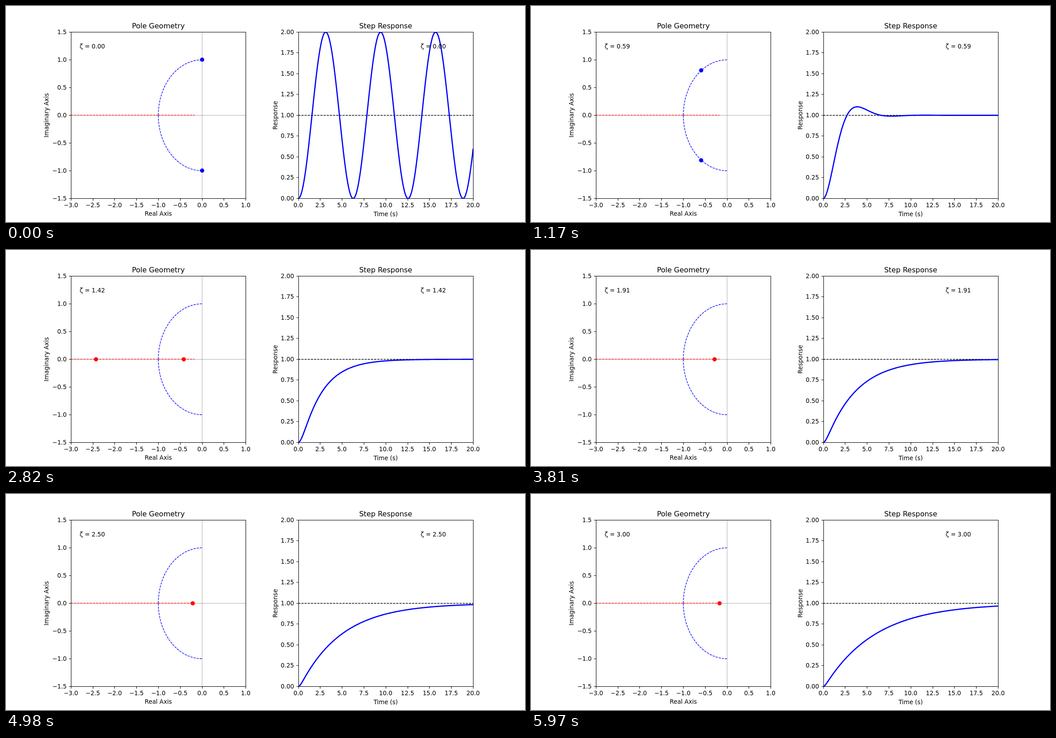
An HTML page for the animation above (6000 ms loop, 1159 by 483 pixels).

```html
<!DOCTYPE html>
<html lang="en">
<head>
<meta charset="utf-8">
<title>Pole geometry and step response</title>
<style>
  html, body { margin: 0; width: 100%; height: 100%; overflow: hidden; background: #fff; }
  svg { display: block; width: 1159px; height: 483px; }
  text { font: 13.333px "DejaVu Sans", sans-serif; fill: #000; }
  .title { font-size: 16px; }
  .frame, .tick { fill: none; stroke: #000; stroke-width: 1.07; }
  .zero { stroke: #808080; stroke-width: 0.67; }
  .dash { fill: none; stroke-width: 1.33; stroke-dasharray: 4.93 2.13; }
  .curve { fill: none; stroke: #00f; stroke-width: 2.67; stroke-linejoin: round; stroke-linecap: square; }
</style>
</head>
<body>
<svg id="stage" viewBox="0 0 1159 483"></svg>
<script>
const STEP = 30, COUNT = 200, MAX_ZETA = 3;
const TOP = 58.4, BOTTOM = 430.3, WIDTH = 390.5;
const svg = document.getElementById('stage');

function add(parent, tag, attrs, text) {
  const el = document.createElementNS('http://www.w3.org/2000/svg', tag);
  for (const k in attrs) el.setAttribute(k, attrs[k]);
  if (text !== undefined) el.textContent = text;
  parent.appendChild(el);
  return el;
}

const label = (x, y, text, anchor = 'middle', more = {}) =>
  add(svg, 'text', { x, y, 'text-anchor': anchor, ...more }, text);
const snap = v => Math.floor(v) + 0.5;
const number = (v, digits) => v.toFixed(digits).replace('-', '\u2212');

// Points along a curve as path data
function trace(axes, fn, from, to, n) {
  let d = '';
  for (let i = 0; i <= n; i++) {
    const [x, y] = fn(from + (to - from) * i / n);
    d += (i ? 'L' : 'M') + axes.x(x).toFixed(2) + ' ' + axes.y(y).toFixed(2);
  }
  return d;
}

function makeAxes(o) {
  const axes = {
    x: v => o.left + (v - o.x0) / (o.x1 - o.x0) * WIDTH,
    y: v => BOTTOM - (v - o.y0) / (o.y1 - o.y0) * (BOTTOM - TOP)
  };
  const clip = add(add(svg, 'defs', {}), 'clipPath', { id: o.id });
  add(clip, 'rect', { x: o.left, y: TOP, width: WIDTH, height: BOTTOM - TOP });
  axes.plot = add(svg, 'g', { 'clip-path': `url(#${o.id})` });

  const left = o.edge + 0.5, bottom = snap(BOTTOM);
  for (let v = o.x0; v <= o.x1; v += o.dx) {
    const x = snap(axes.x(v) + 0.4);
    add(svg, 'path', { class: 'tick', d: `M${x} ${bottom}v4.8` });
    label(axes.x(v), 450, number(v, 1));
  }
  for (let v = o.y0; v <= o.y1; v += o.dy) {
    const y = snap(axes.y(v));
    add(svg, 'path', { class: 'tick', d: `M${left} ${y}h-4.8` });
    label(o.left - 9.3, y + 4.5, number(v, o.digits), 'end');
  }
  add(svg, 'rect', { class: 'frame', x: left, y: snap(TOP), width: 390, height: 372 });

  const mid = o.left + WIDTH / 2;
  label(mid, 50, o.title, 'middle', { class: 'title' });
  label(mid, o.xBase, o.xName);
  label(0, 0, o.yName, 'middle', { transform: `translate(${o.yBase} 244.4) rotate(-90)` });
  axes.note = label(axes.x(o.note[0]), 95, '', 'start');
  return axes;
}

const poles = makeAxes({
  id: 'clipPoles', left: 144.9, edge: 145, x0: -3, x1: 1, dx: 0.5, y0: -1.5, y1: 1.5, dy: 0.5,
  digits: 1, title: 'Pole Geometry', xName: 'Real Axis', yName: 'Imaginary Axis',
  xBase: 469, yBase: 95, note: [-2.8]
});
const step = makeAxes({
  id: 'clipStep', left: 652.6, edge: 653, x0: 0, x1: 20, dx: 2.5, y0: 0, y1: 2, dy: 0.25,
  digits: 2, title: 'Step Response', xName: 'Time (s)', yName: 'Response',
  xBase: 469.5, yBase: 606, note: [14]
});

// Pole plane: zero lines, loci and the two moving poles
add(poles.plot, 'path', { class: 'zero', d: 'M144 244.5H536' });
add(poles.plot, 'path', { class: 'zero', d: 'M438 58V431' });
for (const sign of [1, -1]) {
  add(poles.plot, 'path', { class: 'dash', stroke: '#00f',
    d: trace(poles, a => [-Math.sin(a), sign * Math.cos(a)], 0, Math.PI / 2, 90) });
}
for (const sign of [1, -1]) {
  const end = poles.x(-MAX_ZETA + sign * Math.sqrt(MAX_ZETA ** 2 - 1));
  add(poles.plot, 'path', { class: 'dash', stroke: '#f00', d: `M${poles.x(-1)} 244.2H${end}` });
}
const dots = [1, -1].map(() => add(poles.plot, 'circle', { r: 4.67 }));

// Step response plane
add(step.plot, 'path', { class: 'dash', stroke: '#000', d: 'M652.6 244.5H1044' });
const curve = add(step.plot, 'path', { class: 'curve' });

function response(t, zeta) {
  const w = Math.sqrt(Math.abs(1 - zeta * zeta));
  if (zeta < 1) return 1 - Math.exp(-zeta * t) * (Math.cos(w * t) + zeta / w * Math.sin(w * t));
  const slow = zeta - w, fast = zeta + w;
  return 1 - (fast * Math.exp(-slow * t) - slow * Math.exp(-fast * t)) / (2 * w);
}

function draw(ms) {
  const zeta = Math.floor(ms / STEP) % COUNT / (COUNT - 1) * MAX_ZETA;
  const under = zeta < 1, w = Math.sqrt(Math.abs(1 - zeta * zeta));
  dots.forEach((dot, i) => {
    const s = i ? -w : w;
    dot.setAttribute('cx', Math.round(poles.x(under ? -zeta : -zeta + s)));
    dot.setAttribute('cy', under ? Math.round(poles.y(s)) : 244.5);
    dot.setAttribute('fill', under ? '#00f' : '#f00');
  });
  curve.setAttribute('d', trace(step, t => [t, response(t, zeta)], 0, 20, 400));
  poles.note.textContent = step.note.textContent = 'ζ = ' + zeta.toFixed(2);
}

const start = performance.now();
function loop() {
  draw(performance.now() - start);
  requestAnimationFrame(loop);
}
draw(0);
loop();
</script>
</body>
</html>
```
